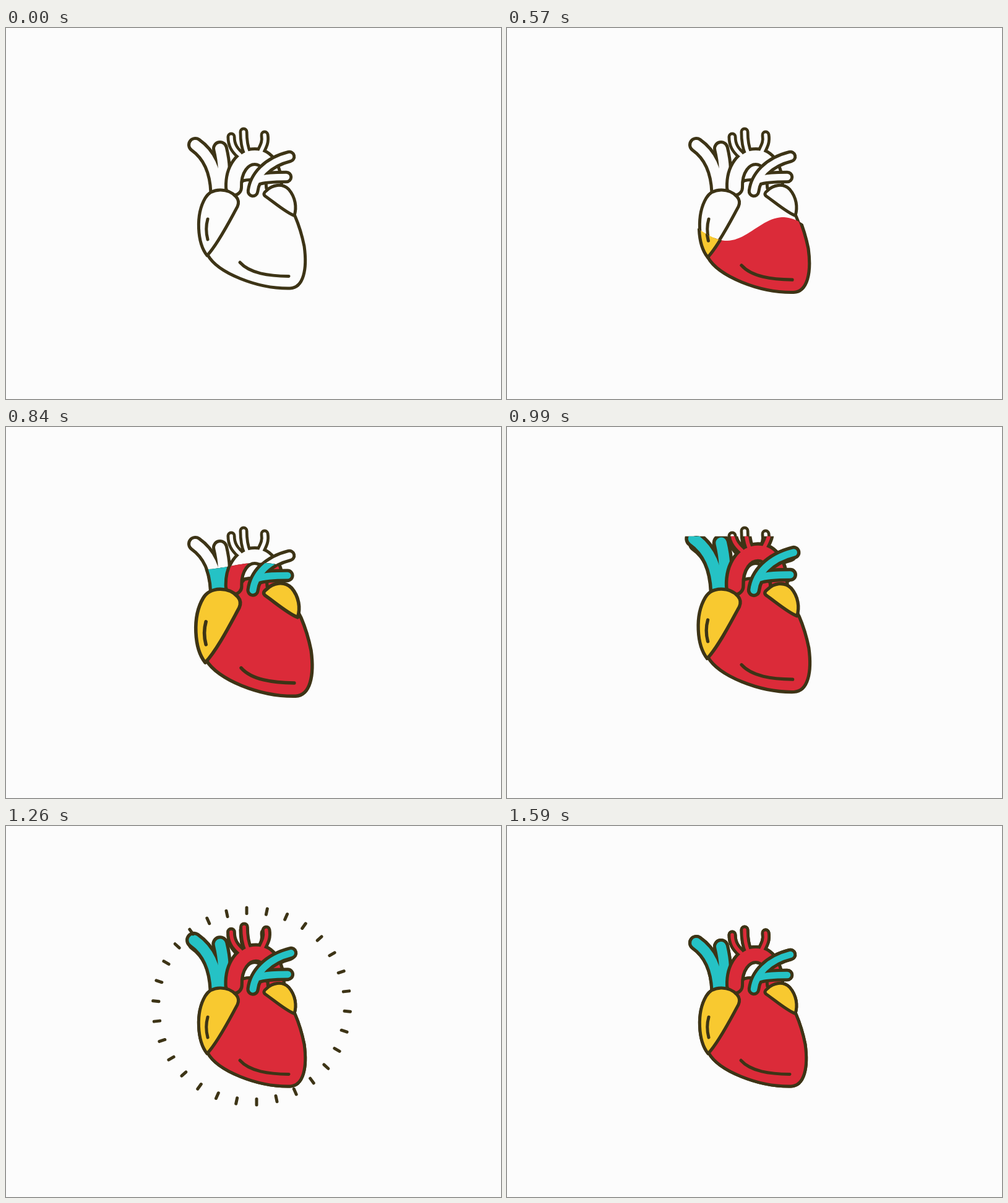
Animation of 800 by 600 pixels, one loop 1770 ms. Source, as an HTML page with a canvas:

```html
<!DOCTYPE html>
<html lang="en">
<head>
<meta charset="utf-8">
<title>Beating heart</title>
<style>
  html, body { margin: 0; width: 100%; height: 100%; overflow: hidden; background: #fcfcfc; }
  canvas { display: block; width: 800px; height: 600px; }
</style>
</head>
<body>
<canvas id="stage" width="800" height="600"></canvas>
<script>
const ctx = document.getElementById('stage').getContext('2d');
const LOOP = 1770, STEP = 30;
const PAPER = '#fcfcfc', INK = '#3d3416';
const RED = '#db2b39', YELLOW = '#f8c930', TEAL = '#25c2c5';
const LINE = 5;

const path = d => new Path2D(d);

const body = path('M326 367C342 396 406 422 459 421C481 420 487 390 482 353C478 333 473 318 467 304C450 268 427 250 410 247Q394 244 383 247L362 270Z');
const bodyShine = path('M378 379C394 397 425 401 457 401.5');
const leftAtrium = path('M325 368C309 348 306 302 322 275C332 258 359 258 372 273Q378 280 374 289C364 307 343 349 325 368Z');
const leftShine = path('M326 309Q321.5 325 326 342');
const rightAtrium = path('M421 263C430 254 446 250 457 261C468 274 470 290 466 303.5C453 299 432 281 419 272Q414 268 421 263Z');

// Each tube is [centre line, outer width, inner width].
const veins = [
  [path('M306 189C326 203 340 227 341.5 266'), 26, 16],
  [path('M346 195C350 212 355 238 345 266'), 26, 16]
];
const aorta = [
  [path('M364 176C364 189 369 197 378 205'), 15, 5.5],
  [path('M384 168C384 181 385 191 390 203'), 15, 5.5],
  [path('M418 173C420 185 416 191 410 203'), 15, 5.5],
  [path('M368 258C367 228 383 208 402 208C422 208 433 228 433 256'), 30, 20]
];
const pulmonary = [
  [path('M399 264C402 240 422 217 458 208'), 20.5, 10.5],
  [path('M405 246C418 241 438 241 453 241'), 20.5, 10.5]
];

const clamp = x => Math.max(0, Math.min(1, x));
const easeInOut = x => (1 - Math.cos(Math.PI * clamp(x))) / 2;
const easeOut = x => 1 - (1 - clamp(x)) ** 2;
const pulse = (t, start, peak, end) =>
  t < peak ? easeInOut((t - start) / (peak - start)) : easeInOut((end - t) / (end - peak));

function stroke(shape, width, color) {
  ctx.lineWidth = width;
  ctx.strokeStyle = color;
  ctx.stroke(shape);
}

function solid(shape, color) {
  ctx.fillStyle = color;
  ctx.fill(shape);
  stroke(shape, LINE, INK);
}

function tubes(list, color) {
  for (const [shape, outer] of list) stroke(shape, outer, INK);
  for (const [shape, , inner] of list) stroke(shape, inner, color);
}

function scaled(x, y, scale, draw) {
  ctx.save();
  ctx.translate(x, y);
  ctx.scale(scale, scale);
  ctx.translate(-x, -y);
  draw();
  ctx.restore();
}

function drawHeart(color, beat) {
  scaled(355, 257, 1 + 0.087 * beat.body, () => {
    solid(body, color(RED));
    stroke(bodyShine, LINE, INK);
  });
  scaled(345, 265, 1 + 0.14 * beat.vessels, () => tubes(veins, color(TEAL)));
  scaled(365, 265, 1 + 0.118 * beat.vessels, () => tubes(aorta, color(RED)));
  scaled(399, 264, 1 + 0.107 * beat.pulmonary, () => tubes(pulmonary, color(TEAL)));
  scaled(350, 260, 1 + 0.12 * beat.atria, () => {
    solid(leftAtrium, color(YELLOW));
    stroke(leftShine, LINE, INK);
  });
  scaled(420, 268, 1 + 0.12 * beat.atria, () => solid(rightAtrium, color(YELLOW)));
}

// Clips to everything below the rising liquid surface.
function clipToLiquid(t) {
  const age = t - 330;
  const level = 428 - 0.4567 * age + 0.000115 * age * age;
  const height = 19.5 * Math.sin(Math.PI * clamp(age / 560));
  const crest = 446 - 0.14 * (t - 570);
  ctx.beginPath();
  ctx.moveTo(0, 600);
  for (let x = 0; x <= 800; x += 4) {
    ctx.lineTo(x, level - height * Math.cos((x - crest) * 2 * Math.PI / 182));
  }
  ctx.lineTo(800, 600);
  ctx.clip();
}

function drawRays(t) {
  const head = 150 + 45 * easeOut((t - 1230) / 270);
  const tail = 150 + 45 * easeOut((t - 1335) / 255);
  if (head - tail < 0.1) return;
  ctx.save();
  ctx.translate(397, 291.5);
  for (let i = 0; i < 30; i++) {
    stroke(path(`M-8 ${-tail}L-8 ${-head}`), LINE, INK);
    ctx.rotate(Math.PI / 15);
  }
  ctx.restore();
}

function render(t) {
  ctx.fillStyle = PAPER;
  ctx.fillRect(0, 0, 800, 600);
  ctx.lineCap = ctx.lineJoin = 'round';

  drawHeart(() => PAPER, { body: 0, atria: 0, vessels: 0, pulmonary: 0 });
  if (t > 330) {
    ctx.save();
    if (t < 1140) clipToLiquid(t);
    drawHeart(c => c, {
      body: pulse(t, 330, 840, 1150),
      atria: pulse(t, 450, 840, 1140),
      vessels: pulse(t, 720, 1110, 1380),
      pulmonary: pulse(t, 660, 1110, 1380)
    });
    ctx.restore();
  }
  drawRays(t);
}

const startTime = performance.now();
function tick() {
  const t = (performance.now() - startTime) % LOOP;
  render(Math.floor(t / STEP) * STEP);
  requestAnimationFrame(tick);
}
tick();
</script>
</body>
</html>
```
